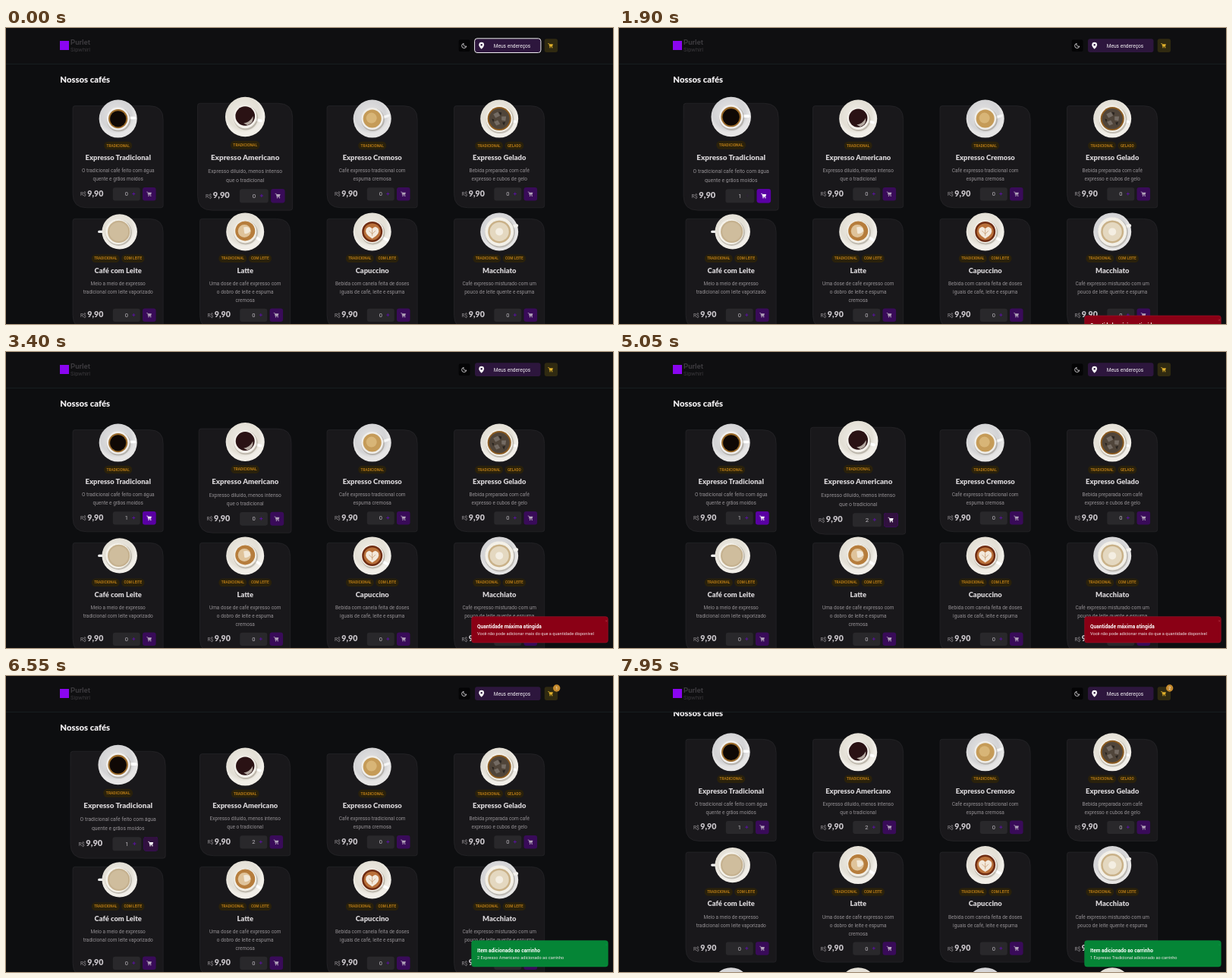
Recreate the animation shown at these times as an HTML page. Size 800 by 390 pixels, loop 8000 ms.

```html
<!DOCTYPE html>
<html lang="pt-BR">
<head>
<meta charset="utf-8">
<style>
html, body { margin: 0; width: 100%; height: 100%; overflow: hidden; background: #0d0e10; }
svg { display: block; width: 800px; height: 390px; font-family: Roboto, sans-serif; }
.head { font-family: Lato, sans-serif; font-weight: 900; }
.mid { text-anchor: middle; }
.bold { font-weight: 700; }
</style>
</head>
<body>
<svg id="stage" viewBox="0 0 800 390"></svg>
<script>
const LOOP = 8000;
const cards = [
  ["Expresso Tradicional", "", ["O tradicional café feito com água", "quente e grãos moídos"]],
  ["Expresso Americano", "", ["Expresso diluído, menos intenso", "que o tradicional"]],
  ["Expresso Cremoso", "", ["Café expresso tradicional com", "espuma cremosa"]],
  ["Expresso Gelado", "GELADO", ["Bebida preparada com café", "expresso e cubos de gelo"]],
  ["Café com Leite", "COM LEITE", ["Meio a meio de expresso", "tradicional com leite vaporizado"]],
  ["Latte", "COM LEITE", ["Uma dose de café expresso com", "o dobro de leite e espuma", "cremosa"]],
  ["Capuccino", "COM LEITE", ["Bebida com canela feita de doses", "iguais de café, leite e espuma"]],
  ["Macchiato", "COM LEITE", ["Café expresso misturado com um", "pouco de leite quente e espuma"]]
];
const colX = c => 147.7 + 167.5 * c;
const text = (x, y, size, fill, s, cls = "", more = "") =>
  `<text x="${x}" y="${y}" font-size="${size}" fill="${fill}" class="${cls}" ${more}>${s}</text>`;
const rect = (x, y, w, h, r, fill, more = "") =>
  `<rect x="${x}" y="${y}" width="${w}" height="${h}" rx="${r}" fill="${fill}" ${more}/>`;
const disc = (x, y, r, fill, more = "") => `<circle cx="${x}" cy="${y}" r="${r}" fill="${fill}" ${more}/>`;
const path = (d, fill, more = "") => `<path d="${d}" fill="${fill}" ${more}/>`;
const line = (d, color, w) => path(d, "none", `stroke="${color}" stroke-width="${w}" stroke-linecap="round"`);
const trolley = (x, y, color) => `<g transform="translate(${x} ${y})">` +
  line("M-3.2-2.7h1.1l.9 4.1h3.2", color, .7) + path("M-1.9-2h5l-.8 2.9h-3.6z", color) +
  disc(-.8, 2.5, .7, color) + disc(2, 2.5, .7, color) + "</g>";

const saucer = tone => disc(0, 0, 25, "url(#" + tone + ")");
const bowl = (r, fill) => disc(.8, 1.2, r + .8, "#8d8578", 'opacity=".45"') + disc(0, 0, r, fill);
const cups = [
  saucer("cool") + line("M13-1H22", "#fff", 3.5) + bowl(15, "#f2f0ee") + disc(0, 0, 12.6, "#9a6a2a") + disc(0, .2, 10.6, "#0f0805"),
  saucer("warm") + line("M12 3L20 5", "#fff", 3.5) + bowl(14.5, "#f4f1eb") + disc(0, -1, 12.2, "#2a1214") +
    path("M-2 8Q6 7 10-1Q11 8 3 10.5z", "#b5aaa2"),
  saucer("cool") + line("M12-1L21-4", "#f6f6f6", 3.5) + bowl(14.5, "#f0eeea") + disc(0, 0, 12, "#c59b58") + disc(-1, -1, 7, "#d8b577"),
  saucer("warm") + line("M14 3L21 4", "#fff", 3.5) + bowl(17.5, "#f3efe6") + disc(0, 0, 15.5, "#8a5a20") + disc(0, 0, 13.5, "#50453a") +
    path("M-8-6l6-3 3 5-6 3zM3-3l6 0-1 6-5-1zM-7 4l5-2 3 5-5 2z", "#746b63") + path("M-1-9l4 1-1 4zM-10 0l3 1-1 4zM4 5l4-1-2 5z", "#292420"),
  line("M-12 0H-25", "#eee", 3.2) + disc(2, 0, 23.2, "url(#warm)") + bowl(16.5, "#f5f2ea") + disc(1, 0, 14.7, "#c5b18f") +
    disc(1, 0, 12.5, "#cfbd9d"),
  saucer("warm") + line("M12 6L20 11", "#fff", 3.5) + bowl(15, "#f3efe6") + disc(0, -1, 13, "#b67d3c") + disc(-1, -1, 8.5, "#dfc39a") +
    path("M-2-6Q6-8 7-1Q3 4-1 2z", "#f2e8d7"),
  saucer("warm") + line("M12 7L20 11", "#fff", 3.5) + bowl(15, "#f6f2ec") + disc(0, 0, 13.5, "#6e2c12") + disc(0, 0, 11, "#b9703a") +
    path("M0 9Q-11 3-8-4Q-4-9 0-4Q4-9 8-4Q11 3 0 9z", "#f3e9dc") + line("M0-3V5M-4-1L0 3L4-1", "#c79a70", .8),
  saucer("cool") + line("M14-6L23-8", "#f4f2ee", 4) + bowl(19, "#f3f0e8") + disc(0, 0, 15, "#c9b188") + disc(0, 0, 12.5, "#e4d8c0") +
    disc(0, 0, 5, "#f4eee2")
];

function pills(second) {
  const w2 = { "": 0, "GELADO": 25, "COM LEITE": 30.5 }[second];
  const x = -(w2 ? 39.3 + w2 : 37) / 2;
  const pill = (px, w, s) => rect(px, 47.2, w, 10.4, 5.2, "#2a210b") + text(px + w / 2, 54.1, 4.7, "#b67a16", s, "mid bold");
  return pill(x, 37, "TRADICIONAL") + (w2 ? pill(x + 39.3, w2, second) : "");
}

// Card origin: middle of its top edge.
function card([title, second, lines], i) {
  const row = i >> 2, h = row ? 145 : 134.2, y = h - 18.3;
  const L = -59.7, R = 59.5;
  return `<g id="card${i}">` +
    path(`M${L + 3} 0H${R - 18}Q${R} 0 ${R} 18V${h - 3}Q${R} ${h} ${R - 3} ${h}H${L + 18}Q${L} ${h} ${L} ${h - 18}V3Q${L} 0 ${L + 3} 0z`,
      "#19181b", 'stroke="#2b2a2e" stroke-width=".6"') +
    `<g transform="translate(0 17)">${cups[i]}</g>` + pills(second) +
    text(0, 71.3, 9.4, "#d6d3d6", title, "head mid") +
    lines.map((s, n) => text(0, 87.6 + 11 * n, 6.5, "#949094", s, "mid")).join("") +
    text(-49.7, y + 2.8, 6.5, "#949094", "R$") + text(-40.4, y + 3.2, 10.6, "#c9c5ca", "9,90", "head") +
    rect(-6.9, y - 8.3, 36, 17.2, 3, "#29282b") +
    text(11.1, y + 2.8, 7.5, "#bcb8be", "0", "mid", `id="qty${i}"`) +
    `<path id="plus${i}" d="M18.6 ${y}h4M20.6 ${y - 2}v4" stroke="#5d12a6" stroke-width=".9"/>` +
    rect(32.3, y - 8.6, 17.6, 17.6, 3, "#390b59") + trolley(41.1, y + .2, "#b3a5bb") +
    `<g id="on${i}" opacity="0">${rect(32.3, y - 8.6, 17.6, 17.6, 3, "#5a00a4")}${trolley(41.1, y + .2, "#fff")}</g>` +
    `<g id="over${i}" opacity="0">${rect(32.3, y - 8.6, 17.6, 17.6, 3, "#31113f")}${trolley(41.1, y + .2, "#fff")}</g></g>`;
}

const shade = (id, a, b) => `<radialGradient id="${id}" cx=".45" cy=".4"><stop stop-color="${b}"/><stop offset=".8" stop-color="${a}"/>` +
  `<stop offset="1" stop-color="${b}"/></radialGradient>`;
stage.innerHTML = `<defs>${shade("cool", "#d3d3d5", "#e6e5e5")}${shade("warm", "#e3dfd5", "#f1eee8")}</defs>` +
  rect(0, 0, 800, 390, 0, "#0d0e10") +
  `<g id="page">${text(71.3, 72.3, 11.3, "#eeecee", "Nossos cafés", "head")}${cards.map(card).join("")}` +
  [0, 1, 2, 3].map(c => `<g transform="translate(${colX(c)} 428.5)">${cups[c]}</g>`).join("") + "</g>" +
  rect(0, 0, 800, 47, 0, "#0f0f11") + rect(0, 47, 800, .7, 0, "#1c2526") +
  rect(71, 17, 12, 12, 0, "#8a05f0") +
  text(85, 22.3, 9.6, "#3b393d", "Purlet", "bold") + text(85, 31.3, 7.4, "#3b393d", "Sipwhirl") +
  rect(596.7, 15.5, 14.8, 15.5, 2, "#040405") +
  path("M603.2 20.4A3.1 3.1 0 1 0 606.8 24A2.7 2.7 0 0 1 603.2 20.4z", "none", 'stroke="#f0eef2" stroke-width=".8"') +
  rect(618, 14.3, 86.5, 17.7, 3, "#2d163d") +
  rect(617.6, 13.8, 87.3, 18.7, 3.4, "none", 'id="ring" stroke="#f0eef2" stroke-width="1"') +
  path("M626.7 27.7Q623.3 24.6 623.3 22.2A3.4 3.4 0 0 1 630.1 22.2Q630.1 24.6 626.7 27.7z", "#fff") + disc(626.7, 22.2, 1.2, "#2d163d") +
  text(667, 25.6, 6.6, "#f3f0f4", "Meus endereços", "mid") +
  rect(709.7, 14.3, 17.4, 17.6, 3, "#302a11") + trolley(717.8, 23.2, "#e0b02c") +
  `<g id="badge">${disc(725.7, 16, 4.7, "#c58a2e")}${text(725.7, 18, 5.4, "#fff", "", "mid", 'id="count"')}</g>` +
  `<g id="toast">${rect(613.7, 348.7, 179.6, 34.2, 3, "#8a0015", 'id="panel" stroke-width=".6"')}` +
  text(621, 363.5, 6.6, "#fff", "", "bold", 'id="heading"') + text(621, 373.2, 5.6, "#f1e6e8", "", "", 'id="detail"') +
  `<path id="close" d="M790.3 353.4l2 2m0-2l-2 2" stroke-width=".5"/></g>`;

const $ = id => document.getElementById(id);
const set = (id, name, v) => $(id).setAttribute(name, v);
const between = (t, a, b) => t >= a && t < b;
const clamp = v => Math.max(0, Math.min(1, v));
const ease = (t, a, b) => 1 - (1 - clamp((t - a) / (b - a))) ** 2.4;

// Toasts: start time, success flag, detail.
const toasts = [
  [1890, false, ""], [2640, false, ""],
  [5390, true, "2 Expresso Americano adicionado ao carrinho"],
  [7100, true, "1 Expresso Tradicional adicionado ao carrinho"]
];

function draw(t) {
  const hover = [
    ease(t, 430, 700) - ease(t, 2980, 3200) + ease(t, 6330, 6550) - ease(t, 7220, 7430),
    1 - ease(t, 30, 250) + ease(t, 3360, 3550) - ease(t, 5880, 6100) + ease(t, 7430, 7650) - ease(t, 7810, 7950)
  ];
  cards.forEach((_, i) => {
    const s = 1 + .05 * (hover[i] || 0), row = i >> 2;
    const y = row ? 251.4 : 102.6 - 67.1 * (s - 1);
    set("card" + i, "transform", `translate(${colX(i % 4)} ${y}) scale(${s})`);
  });
  set("page", "transform", `translate(0 ${-19.3 * clamp((t - 7810) / 140)})`);

  $("qty0").textContent = t < 1000 ? 0 : 1;
  $("qty1").textContent = t < 4150 ? 0 : t < 4600 ? 1 : 2;
  set("plus0", "stroke", between(t, 950, 2900) ? "#2f2538" : "#5d12a6");
  set("plus1", "stroke", between(t, 3800, 4800) ? "#2f2538" : "#5d12a6");
  set("on0", "opacity", t < 7100 ? ease(t, 990, 1100) : 0);
  set("on1", "opacity", between(t, 4150, 5350) ? 1 : 0);
  set("over0", "opacity", t < 7100 ? ease(t, 6400, 6550) : 0);
  set("over1", "opacity", t < 5350 ? ease(t, 4920, 5050) : 0);

  set("ring", "opacity", 1 - ease(t, 940, 1100));
  set("badge", "opacity", t < 5350 ? 0 : 1);
  $("count").textContent = t < 7100 ? 1 : 2;

  const now = toasts.filter(e => e[0] <= t).pop();
  set("toast", "opacity", now ? 1 : 0);
  if (!now) return;
  const [start, ok, detail] = now;
  set("toast", "transform", `translate(0 ${34.5 * (1 - ease(t, start, start + 210))})`);
  set("panel", "fill", ok ? "#058536" : "#8a0015");
  set("panel", "stroke", ok ? "#0a8f3e" : "#a3122a");
  set("close", "stroke", ok ? "#0a9a44" : "#c04a58");
  $("heading").textContent = ok ? "Item adicionado ao carrinho" : "Quantidade máxima atingida";
  $("detail").textContent = ok ? detail : "Você não pode adicionar mais do que a quantidade disponível";
}

const began = performance.now();
function tick() {
  draw((performance.now() - began) % LOOP);
  requestAnimationFrame(tick);
}
tick();
</script>
</body>
</html>
```
